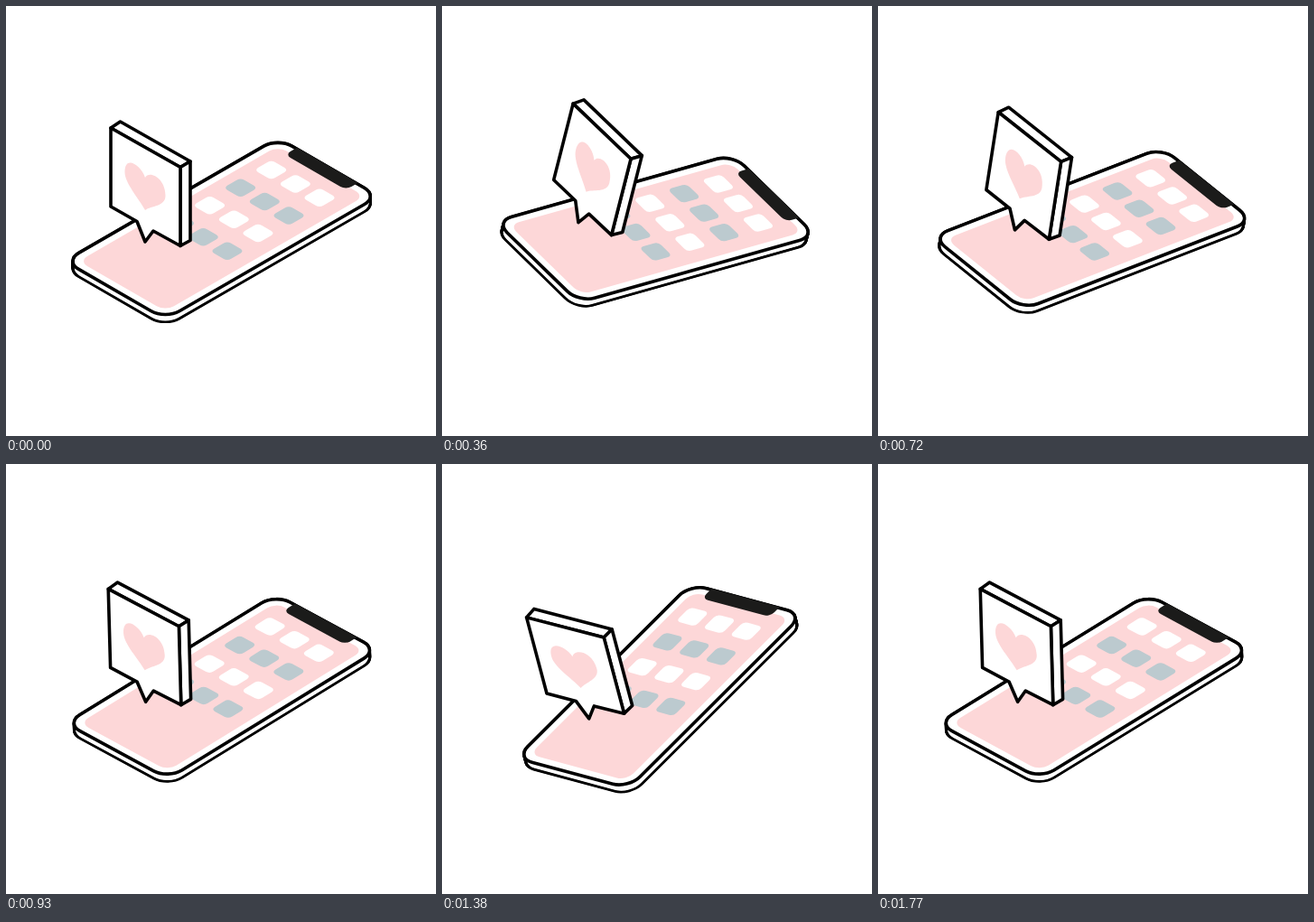
An HTML page with a canvas for the animation above (1800 ms loop, 476x476 px).

```html
<!DOCTYPE html>
<html lang="en">
<head>
<meta charset="utf-8">
<title>Phone with heart bubble</title>
<style>
  html, body { margin: 0; width: 100%; height: 100%; overflow: hidden; background: #fff; }
  canvas { display: block; width: 476px; height: 476px; }
</style>
</head>
<body>
<canvas id="stage" width="476" height="476"></canvas>
<script>
(() => {
  const ctx = document.getElementById('stage').getContext('2d');
  const LOOP = 1800, STEP = 30, SWING = 15 * Math.PI / 180;
  const SIZE = 476, MID = SIZE / 2;
  const COS = Math.sqrt(3) / 2, SIN = 0.5;
  const INK = '#000', PAPER = '#fff', PINK = '#fdd7d8', BLUE = '#bccacf', DARK = '#1b1b1a';

  // Phone measures in its own plane: u runs up right, v runs down right
  const LEN = 272.6, WID = 128.7, ROUND = 18, DEPTH = 8;
  const ORIGIN = [64.9, 282.4];

  function place(path, a, b, c, d, e, f) {
    const out = new Path2D();
    out.addPath(path, new DOMMatrix([a, b, c, d, e, f]));
    return out;
  }

  function flatRect(u, v, w, h, r, drop = 0) {
    const p = new Path2D();
    p.roundRect(u, v, w, h, r);
    return place(p, COS, -SIN, COS, SIN, ORIGIN[0], ORIGIN[1] + drop);
  }

  const face = (inset, drop) =>
    flatRect(inset, inset, LEN - 2 * inset, WID - 2 * inset, ROUND - inset, drop);

  function poly(...pts) {
    const p = new Path2D();
    pts.forEach(([x, y]) => p.lineTo(x, y));
    p.closePath();
    return p;
  }

  function fill(path, color) {
    ctx.fillStyle = color;
    ctx.fill(path);
  }

  function line(path, width) {
    ctx.lineWidth = width;
    ctx.stroke(path);
  }

  const drops = Array.from({ length: DEPTH * 2 + 1 }, (_, i) => DEPTH - i / 2);
  const rims = drops.map(d => face(0, d));
  const sides = drops.map(d => face(1.5, d));
  const lid = face(0, 0);
  const glass = flatRect(9, 9, LEN - 18, WID - 18, 11);
  const notch = flatRect(LEN - 14, 23, 15.5, 78, [7, 0, 0, 7]);

  const tiles = [];
  for (let row = 0; row < 4; row++) {
    for (let col = 0; col < 3; col++) {
      const u = 233 - row * 39.3, v = 62 + (col - 1) * 30.8;
      tiles.push([flatRect(u - 11, v - 11, 22, 22, 5), row % 2 ? BLUE : PAPER]);
    }
  }

  const bubbleFront = poly([116, 135], [193, 178.5], [193, 265.5], [163, 249],
    [154, 261], [145, 238.5], [116, 222]);
  const bubbleTop = poly([116, 135], [126.5, 128], [204, 172], [193, 178.5]);
  const bubbleSide = poly([193, 178.5], [204, 172], [204, 259.5], [193, 265.5]);
  const heart = place(new Path2D(
    'M0-11C-5-22-26-24-26-4C-26 8-8 16 0 25C8 16 26 8 26-4C26-24 5-22 0-11Z'),
    COS, SIN, 0, 1, 154, 201);

  function drawPhone() {
    rims.forEach(p => line(p, 3.2));
    sides.forEach(p => fill(p, PAPER));
    line(lid, 3.6);
    fill(glass, PINK);
    tiles.forEach(([p, color]) => fill(p, color));
    fill(notch, DARK);
  }

  function drawBubble() {
    [bubbleTop, bubbleSide, bubbleFront].forEach(p => {
      fill(p, PAPER);
      line(p, 3.6);
    });
    fill(heart, PINK);
  }

  function draw(now) {
    const t = Math.floor((now % LOOP) / STEP) * STEP;
    ctx.setTransform(1, 0, 0, 1, 0, 0);
    ctx.fillStyle = PAPER;
    ctx.fillRect(0, 0, SIZE, SIZE);
    ctx.translate(MID, MID);
    ctx.rotate(SWING * Math.sin(2 * Math.PI * t / LOOP));
    ctx.translate(-MID, -MID);
    ctx.strokeStyle = INK;
    ctx.lineJoin = 'round';
    drawPhone();
    drawBubble();
  }

  let start;
  function tick(now) {
    start ??= now;
    draw(now - start);
    requestAnimationFrame(tick);
  }
  draw(0);
  requestAnimationFrame(tick);
})();
</script>
</body>
</html>
```
